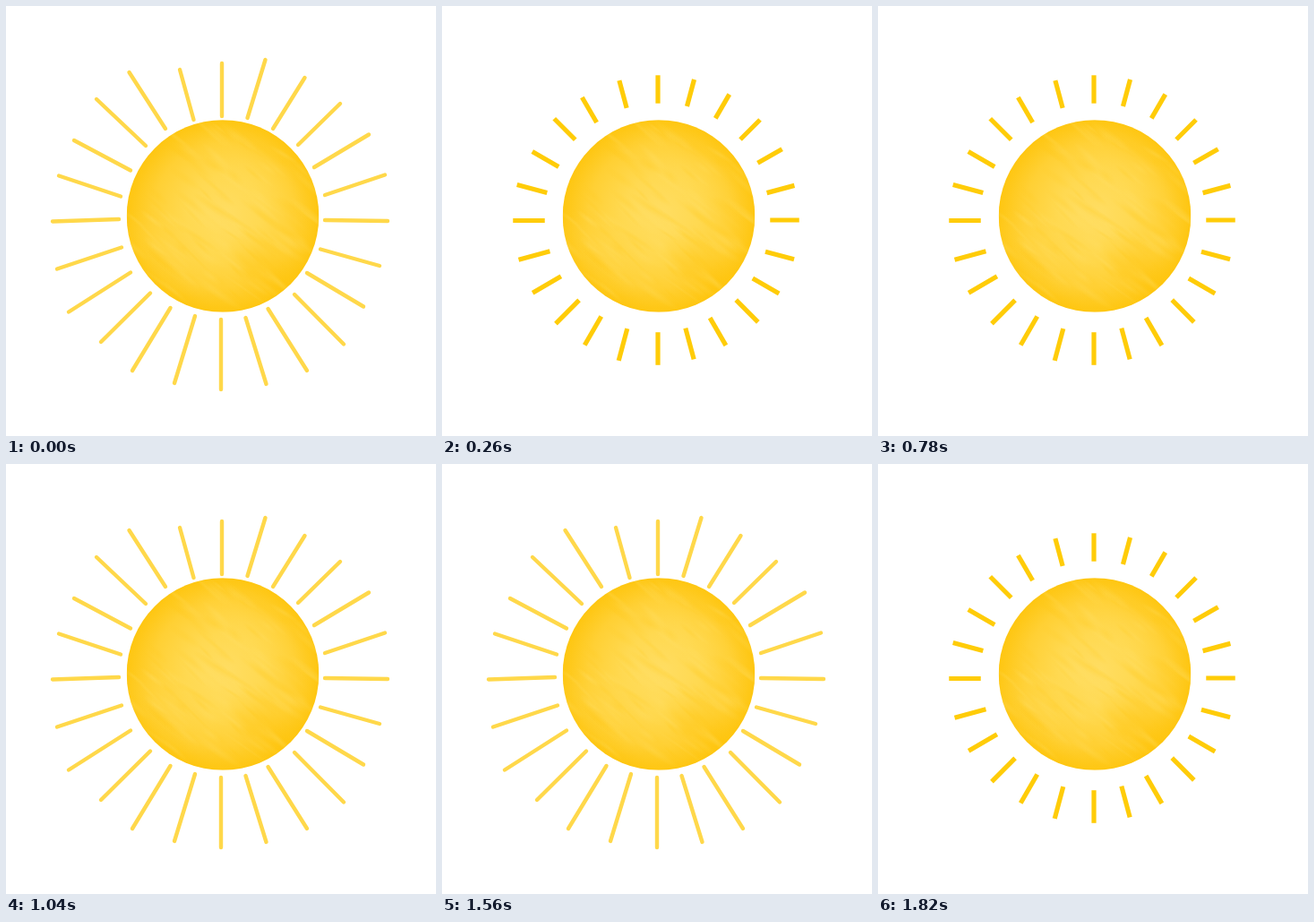
An HTML page with a canvas for the animation above (2.08 s loop, 480 px wide and 480 px high).

```html
<!DOCTYPE html>
<html lang="en">
<head>
<meta charset="utf-8">
<title>Sun</title>
<style>
  html, body { margin: 0; width: 100%; height: 100%; overflow: hidden; background: #fff; }
  canvas { display: block; }
</style>
</head>
<body>
<canvas id="stage" width="480" height="480"></canvas>
<script>
const ctx = document.getElementById('stage').getContext('2d');
const STEP = 260;
const SUN = { x: 242, y: 234.5, r: 107.3 };

// Hand-drawn long rays: outer x, y, inner x, y, clockwise from the top.
const LONG = [
  [241, 64, 241, 123], [289.5, 60, 269.5, 125], [333.5, 80, 298, 137], [373, 109, 326, 155],
  [405, 143.5, 344, 180], [423, 188.5, 356, 211], [426, 240, 356, 239], [417, 290, 351, 271.5],
  [399, 335.5, 336, 298], [377, 377.5, 322, 322], [336, 407, 292.5, 338], [290.5, 422, 267.5, 348],
  [240, 428, 240, 350], [188, 421, 211, 346], [141, 407, 183.5, 337], [106, 375, 161, 320.5],
  [70, 341.5, 139, 297.5], [57, 293.5, 129, 269.5], [52, 240.5, 126, 238], [59, 189.5, 128, 212.5],
  [76, 150, 139, 183.5], [101, 104, 156, 156], [137.5, 74, 178, 137], [194, 71, 209.5, 127]
];

// Midpoints of the short rays; each is turned 15 degrees further.
const SHORT = [
  [241, 93], [277.5, 97], [313, 112], [344, 138], [366, 167.5], [378, 204.5],
  [382.5, 239], [377, 278.5], [361.5, 312.5], [340.5, 340.5], [308, 363.5], [276.5, 377],
  [241, 382.5], [202, 378], [168.5, 362.5], [140, 341.5], [117, 311], [103, 278.5],
  [97, 239.5], [100.5, 204], [115.5, 171], [137, 137.5], [164.5, 116], [202, 98.5]
];

function seeded(seed) {
  return () => (seed = (seed * 16807) % 2147483647) / 2147483647;
}

function line(x1, y1, x2, y2) {
  ctx.beginPath();
  ctx.moveTo(x1, y1);
  ctx.lineTo(x2, y2);
  ctx.stroke();
}

function drawLong() {
  ctx.strokeStyle = '#ffd84a';
  ctx.lineWidth = 4.4;
  ctx.lineCap = 'round';
  LONG.forEach(ray => line(...ray));
}

function drawShort() {
  ctx.strokeStyle = '#ffcc08';
  ctx.lineWidth = 5.2;
  ctx.lineCap = 'butt';
  SHORT.forEach(([x, y], i) => {
    const a = i * Math.PI / 12;
    const half = 17 - 1.5 * Math.cos(a - Math.PI / 6);
    const dx = Math.sin(a) * half, dy = -Math.cos(a) * half;
    line(x - dx, y - dy, x + dx, y + dy);
  });
}

function smear(x, y, length, width, angle, rgb, alpha) {
  ctx.save();
  ctx.translate(x, y);
  ctx.rotate(angle);
  ctx.scale(length, width);
  const g = ctx.createRadialGradient(0, 0, 0, 0, 0, 1);
  g.addColorStop(0, `rgba(${rgb},${alpha})`);
  g.addColorStop(1, `rgba(${rgb},0)`);
  ctx.fillStyle = g;
  ctx.fillRect(-1, -1, 2, 2);
  ctx.restore();
}

function drawSun() {
  const { x, y, r } = SUN;
  const rand = seeded(417);
  ctx.save();
  ctx.beginPath();
  ctx.arc(x, y, r, 0, Math.PI * 2);
  ctx.clip();
  const g = ctx.createRadialGradient(x + 4, y - 4, 0, x, y, r);
  g.addColorStop(0, '#ffdd62');
  g.addColorStop(0.4, '#ffd951');
  g.addColorStop(0.75, '#ffd034');
  g.addColorStop(1, '#fec611');
  ctx.fillStyle = g;
  ctx.fillRect(x - r, y - r, 2 * r, 2 * r);
  smear(x + 62, y + 70, 72, 34, 0.65, '255,195,8', 0.5);
  smear(x - 62, y + 42, 70, 36, 0.6, '255,220,92', 0.3);
  smear(x + 30, y - 50, 75, 30, 0.65, '255,220,92', 0.28);
  for (let i = 0; i < 130; i++) {
    const a = rand() * Math.PI * 2, d = Math.sqrt(rand()) * r;
    const rgb = rand() < 0.5 ? '255,226,112' : '255,200,22';
    smear(x + Math.cos(a) * d, y + Math.sin(a) * d, 12 + rand() * 24,
      2 + rand() * 4, 0.55 + rand() * 0.25, rgb, 0.14 + rand() * 0.12);
  }
  ctx.restore();
}

let shown = -1;
function draw(now) {
  const pose = Math.floor(now / STEP) % 2;
  if (pose !== shown) {
    shown = pose;
    ctx.fillStyle = '#fff';
    ctx.fillRect(0, 0, 480, 480);
    if (pose) drawShort(); else drawLong();
    drawSun();
  }
}

function tick() {
  draw(performance.now() - start);
  requestAnimationFrame(tick);
}

const start = performance.now();
tick();
</script>
</body>
</html>
```
